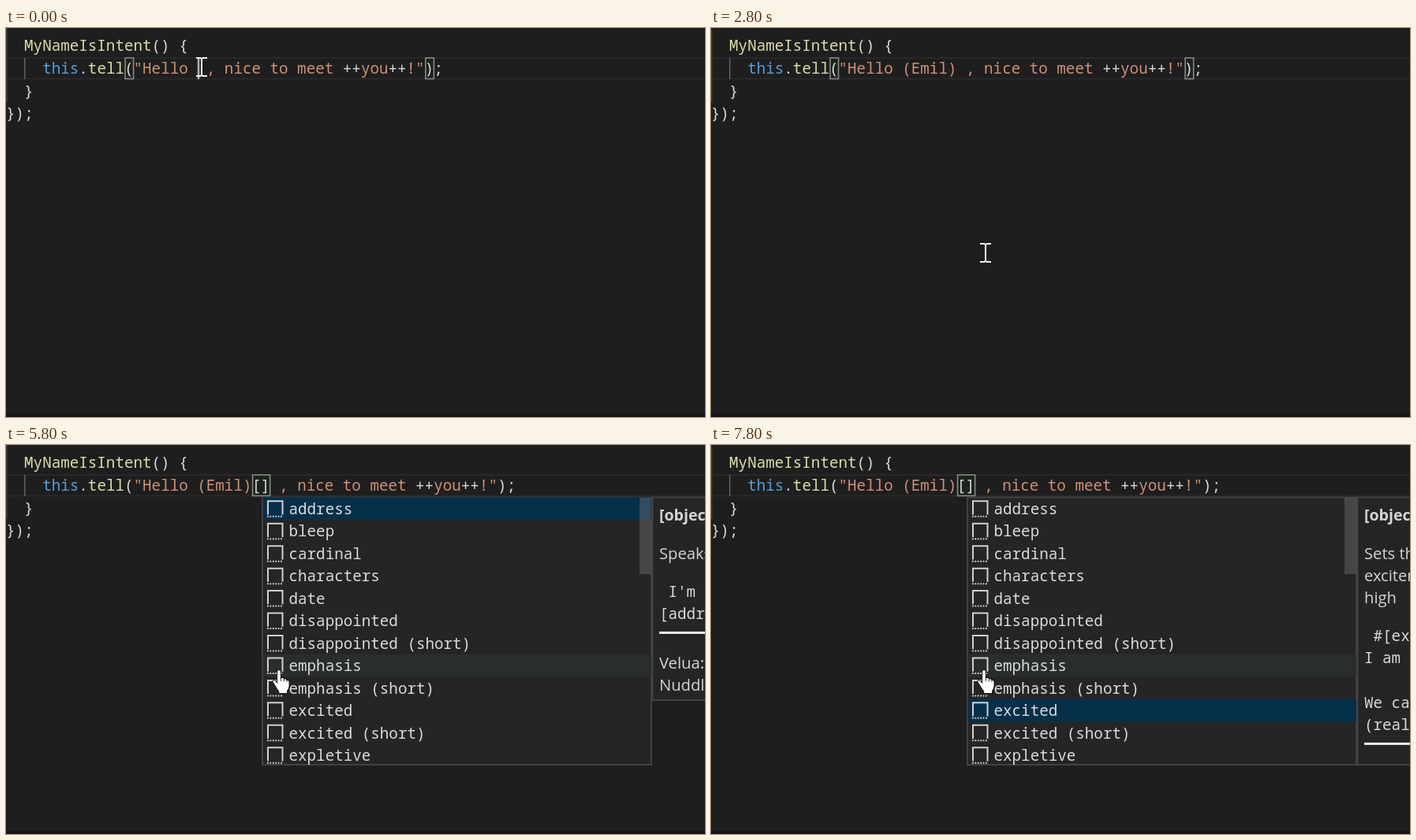
An HTML page that plays this animation: 886x494 px, repeating every 8000 ms.

```html
<!DOCTYPE html>
<html lang="en">
<head>
<meta charset="utf-8">
<title>Editor suggestions</title>
<style>
  html, body { margin: 0; width: 100%; height: 100%; overflow: hidden; background: #1e1e1e; }
  svg { display: block; width: 886px; height: 494px; }
  text { white-space: pre; }
  .mono { font: 500 19.2px "Noto Sans Mono", monospace; letter-spacing: .02px; fill: #dadada; }
  .ui { font: 20.2px "Open Sans", sans-serif; fill: #d4d4d4; }
  .title { font-weight: 700; font-size: 19.6px; }
</style>
</head>
<body>
<svg viewBox="0 0 886 494">
  <rect width="886" height="494" fill="#1e1e1e"/>
  <rect y="490" width="886" height="4" fill="#19121a"/>
  <g id="code"></g>
  <g id="popup"></g>
  <g id="mouse"></g>
</svg>
<script>
const LOOP = 8000, TICK = 200;
const CH = 11.54, LINE = 28.8, ROW = 28.45;
const FN = '#dcdcaa', KEY = '#569cd6', STR = '#ce9178', FG = '#dadada';
const NAME = 'Emil';
const BRANDS = ['Velua: yes', 'Nuddle: yes', 'Zelvu: yes'];

const ITEMS = ['address', 'bleep', 'cardinal', 'characters', 'date', 'disappointed',
  'disappointed (short)', 'emphasis', 'emphasis (short)', 'excited', 'excited (short)', 'expletive'];

const mood = (noun, tag) => ({
  desc: ['Sets the', noun + ' to', 'high'],
  mono: [` #[${tag}]`, 'I am here', '', 'We can do', '(really) it']
});

// One entry per list item that gets selected
const DOCS = [
  { desc: ['Speaks the value'], mono: [" I'm at (here)", '[address]'], brands: 2 },
  { desc: ['Censors a word'], mono: [' You (word)', '[bleep]'], brands: 2 },
  { desc: ['Speaks a number'], mono: [' One, two', '[cardinal]'] },
  { desc: ['Speaks characters'], mono: [' Countdown', ' The word'] },
  { desc: ['Speaks a date'], mono: [' The date is', '[date]'] },
  mood('disappointment', 'disappointed'),
  mood('disappointment', 'disappointed'),
  { desc: ['Add or remove'], mono: [' A (strong) word'] },
  { desc: ['Add or remove'], mono: [' A +strong+ word'] },
  mood('excitement', 'excited')
];

const layer = id => document.getElementById(id);
const rect = (x, y, w, h, fill, more = '') =>
  `<rect x="${x}" y="${y}" width="${w}" height="${h}" fill="${fill}" ${more}/>`;
const label = (x, y, s, cls) => `<text x="${x}" y="${y}" class="${cls}">${s}</text>`;
const within = (t, a, b) => t >= a && t < b;

function codeLine(row, col, parts) {
  const spans = parts.map(([s, c]) => `<tspan fill="${c}">${s}</tspan>`).join('');
  return `<text class="mono" x="${col * CH}" y="${29 + row * LINE}">${spans}</text>`;
}

const bracketBox = (col, n = 1) =>
  rect(col * CH + 1, 38, n * CH - 1, 26.5, '#1b231b', 'stroke="#888" stroke-width="1.6"');

function typed(t) {
  if (t < 1400) return '';
  const n = t < 2000 ? 0 : Math.min(4, (t - 2000) / TICK + 2);
  return `(${NAME.slice(0, n)})`;
}

function caretCol(t, len) {
  if (t < 1400) return 21;
  if (t < 2600) return 20 + len;
  return t < 4400 ? 27 : 28;
}

const caretOff = t => [[400, 1000], [2800, 3400], [3800, 4200], [5600, 6200], [6600, 7000], [7600, 8000]]
  .some(([a, b]) => within(t, a, b));

function drawCode(t) {
  const word = typed(t), tags = t >= 4400;
  const close = 39 + word.length;
  const slot = tags ? '[]' : '';
  const boxes = tags ? bracketBox(27, 2) : bracketBox(13) + bracketBox(close + 7);
  const caret = caretOff(t) ? '' : rect(caretCol(t, word.length) * CH + 0.4, 38, 2.6, 27, '#aeafad');
  return rect(2, 37, 884, 2, '#282828') + rect(2, 63.5, 884, 2, '#282828') +
    rect(0, 0, 1.6, 94, '#404040') + rect(23, 38, 1.6, 27, '#606060') + boxes +
    codeLine(0, 2, [['MyNameIsIntent', FN], ['() {', FG]]) +
    codeLine(1, 4, [
      ['this', KEY], ['.', FG], ['tell', FN], ['(', FG], ['"Hello ' + word, STR], [slot, FG],
      [' , nice to meet ', STR], ['++', FG], ['you', STR], ['++', FG], ['!"', STR], [');', FG]
    ]) +
    codeLine(2, 2, [['}', FG]]) +
    codeLine(3, 0, [['});', FG]]) + caret;
}

function drawItem(name, i, pick, hover) {
  const y = 67 + i * ROW;
  const fill = i === pick ? '#062f4a' : i === hover ? '#2a2d2e' : '';
  return (fill ? rect(325.8, y - 0.7, 492, ROW + 0.8, fill) : '') +
    `<g fill="none" stroke="#d0d0d0" stroke-width="2">
      <path d="M332 ${y + 21.5}V${y + 4.3}H350.5V${y + 21.5}"/>
      <path d="M331 ${y + 23.8}H351.5" stroke-dasharray="1.8 1.6"/></g>` +
    label(358.5, y + 21, name, 'mono');
}

function drawDocs({ desc, mono, brands = 3 }) {
  let y = 145, out = label(828, 96, '[object Object]', 'ui title');
  const lines = (list, cls) => list.forEach(s => { out += label(828, y, s, cls); y += 28.2; });
  lines(desc, 'ui');
  y += 19.5;
  lines(mono, 'mono');
  const rule = y - 10.7;
  out += rect(828, rule - 1.5, 70, 3, '#f0f0f0');
  y = rule + 45.5;
  lines(BRANDS.slice(0, brands), 'ui');
  const end = Math.min(406, y - 16.2);
  return rect(819.5, 66.5, 90, end - 66.5, '#252526', 'stroke="#454545" stroke-width="1.8"') +
    `<clipPath id="panel"><rect x="820" y="67" width="66" height="${end - 68}"/></clipPath>` +
    `<g clip-path="url(#panel)">${out}</g>`;
}

function drawPopup(t) {
  if (t < 4600) return '';
  const pick = Math.max(0, Math.floor((t - 6000) / TICK));
  const hover = t >= 4800 ? 7 : -1;
  return rect(325, 66.5, 493, 339.5, '#252526', 'stroke="#454545" stroke-width="1.8"') +
    ITEMS.map((s, i) => drawItem(s, i, pick, hover)).join('') +
    rect(803, 67, 14.5, 97, '#797979', 'fill-opacity=".4"') +
    (t >= 5000 ? drawDocs(DOCS[pick]) : '');
}

function drawMouse(t) {
  if (t >= 4800) {
    return `<g transform="translate(336.3 284.3) scale(1.04)" stroke="#111">
      <path fill="#fff" d="M7 3.5a2.3 2.3 0 0 1 4.6 0v7.5q3.6-1 3.9 1.2 3-.8 3.4 1.4 3-.4 3 2.4v5q0 3-2.4 6v3h-10.5v-2.5q-2.5-3-4.2-6.5l-3-4.5q-1-2.5 1.6-2.8 1.8.2 3.6 3z"/>
      <path fill="none" stroke-width=".8" d="M11.6 11v4M15.5 12.2v3.3M18.9 13.6v2.6"/></g>`;
  }
  const left = 1 - Math.min(1, t / 600), p = 1 - left * left;
  return `<path transform="translate(${248 + 100 * p} ${49.5 + 236 * p})" fill="none" stroke="#f0f0f0"
    stroke-width="2" d="M-7-11.5h5.5L0-10.5 1.5-11.5H7M-7 11.5h5.5L0 10.5 1.5 11.5H7M0-10.5V10.5"/>`;
}

function render(t) {
  layer('code').innerHTML = drawCode(t);
  layer('popup').innerHTML = drawPopup(t);
  layer('mouse').innerHTML = drawMouse(t);
}

let start = null, shown = -1;
function loop(now) {
  if (start === null) start = now;
  const t = Math.floor((now - start) % LOOP / TICK) * TICK;
  if (t !== shown) render(shown = t);
  requestAnimationFrame(loop);
}
render(0);
requestAnimationFrame(loop);
</script>
</body>
</html>
```
